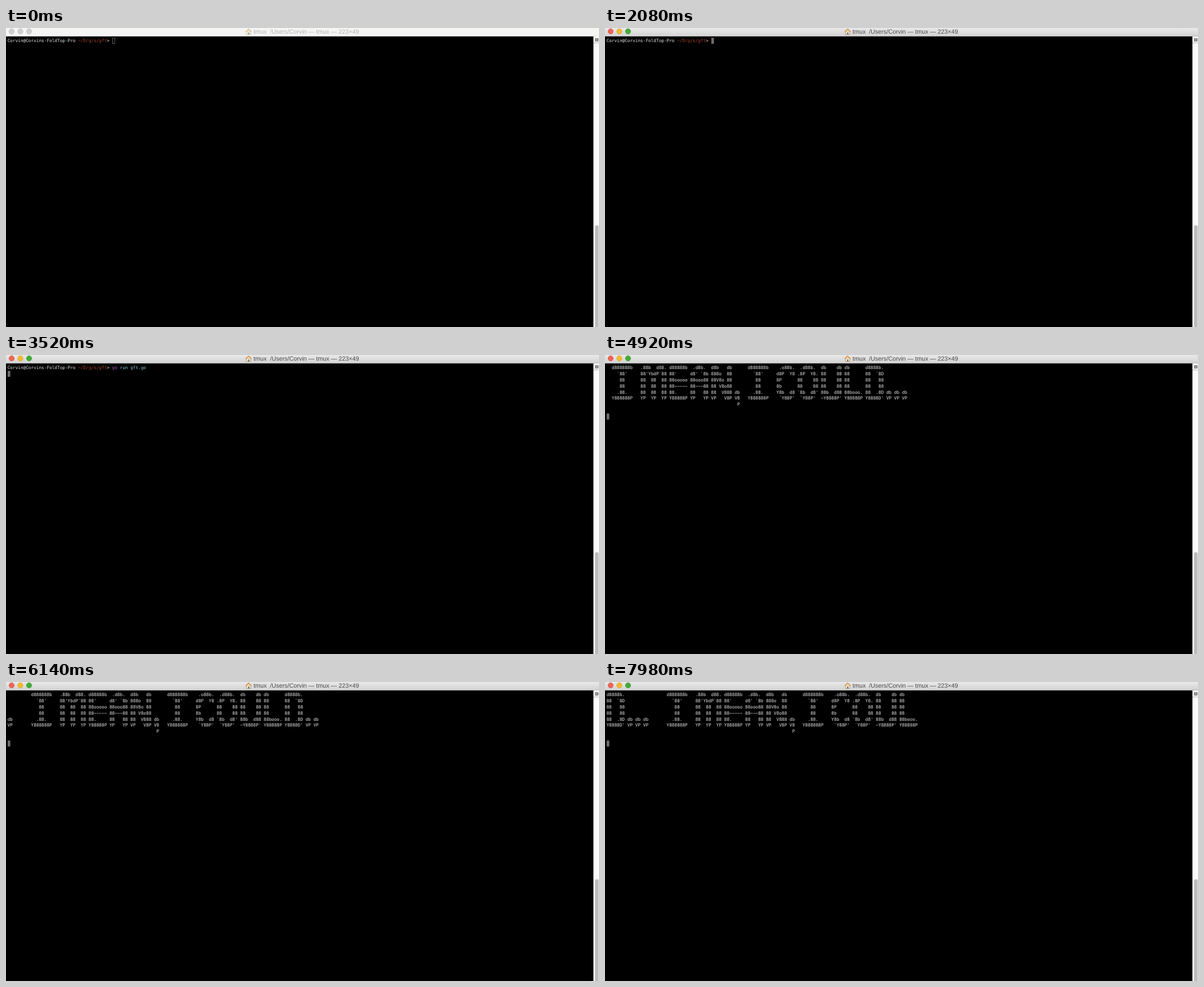
An HTML page that plays this animation: 1054 by 531 pixels, repeating every 8 s.

```html
<!DOCTYPE html>
<html lang="en">
<head>
<meta charset="utf-8">
<title>Terminal banner</title>
<style>
  html, body { margin: 0; width: 100%; height: 100%; overflow: hidden; background: #000; }
  svg { display: block; width: 1054px; height: 531px; }
  text { white-space: pre; text-rendering: geometricPrecision; }
  #title { font: 10.77px "Liberation Sans", Arial, sans-serif; }
  #screen { font: 7.724px "DejaVu Sans Mono", monospace; fill: #e6e6e6; }
</style>
</head>
<body>
<svg viewBox="0 0 1054 531" xmlns="http://www.w3.org/2000/svg">
  <defs>
    <linearGradient id="active" x2="0" y2="1">
      <stop offset="0" stop-color="#e9e9e9"/>
      <stop offset="1" stop-color="#d1d1d1"/>
    </linearGradient>
  </defs>
  <rect width="1054" height="531"/>

  <rect id="bar" width="1054" height="15"/>
  <rect id="edge" y="14" width="1054" height="1"/>
  <g id="lights" stroke-width=".8">
    <circle cx="10" cy="6" r="4.6"/>
    <circle cx="25.5" cy="6" r="4.6"/>
    <circle cx="41" cy="6" r="4.6"/>
  </g>
  <g id="house">
    <path d="M427.5 6.5h7.5v5h-7.5z" fill="#f4efe2" stroke="#8d7a5c" stroke-width=".7"/>
    <path d="M430.2 8h2.4v3.5h-2.4z" fill="#8a6a3c"/>
    <path d="M426 6.8l5.2-5 5.2 5" fill="#f0d9a8" stroke="#c9803a" stroke-width="1.3"/>
  </g>
  <text id="title" x="440" y="10">tmux  /Users/Corvin — tmux — 223×49</text>

  <rect x="1044" y="15" width="10" height="516" fill="#fafafa"/>
  <rect x="1044" y="15" width="1" height="516" fill="#e4e4e4"/>
  <rect x="1044" y="26" width="10" height="1" fill="#b8b8c0"/>
  <path d="M1047.5 18.5h5v5h-5zM1047.5 20.2h5M1047.5 21.8h5" fill="#d8d8d8" stroke="#555" stroke-width=".8"/>
  <path d="M1047 531V353.5a3.2 3.2 0 0 1 6.4 0V531z" fill="#bcbcbc"/>

  <rect id="cursor"/>
  <g id="screen"></g>
</svg>
<script>
const LOOP = 8000, FOCUS = 1120, TYPE = 2180, ENTER = 3100, BANNER = 4600;
const LEFT = 2.7, CELL = 4.65, LINE = 10.83, COLS = 120;
const COMMAND = "go run gft.go", PROMPT_COLS = 40;

const glyphs = {
  " ": " ",
  I: "d888888b|  `88'|   88|   88|  .88.|Y888888P",
  M: ".88b  d88.|88'YbdP`88|88  88  88|88  88  88|88  88  88|YP  YP  YP",
  E: "d88888b|88'|88ooooo|88~~~~~|88.|Y88888P",
  A: " .d8b.|d8' `8b|88ooo88|88~~~88|88   88|YP   YP",
  N: "d8b   db|888o  88|88V8o 88|88 V8o88|88  V888|VP   V8P",
  ",": "||||db|V8| P",
  C: " .o88b.|d8P  Y8|8P|8b|Y8b  d8| `Y88P'",
  O: " .d88b.|.8P  Y8.|88    88|88    88|`8b  d8'| `Y88P'",
  U: "db    db|88    88|88    88|88    88|88b  d88|~Y8888P'",
  L: "db|88|88|88|88booo.|Y88888P",
  D: "d8888b.|88  `8D|88   88|88   88|88  .8D|Y8888D'",
  ".": "||||db|VP"
};

function bannerRows(words) {
  const rows = Array(7).fill("");
  for (const ch of words) {
    const parts = glyphs[ch].split("|");
    const width = Math.max(...parts.map(p => p.length)) + 1;
    rows.forEach((row, i) => rows[i] = row + (parts[i] || "").padEnd(width));
  }
  return rows.map(row => row.padEnd(COLS));
}

const $ = id => document.getElementById(id);
const set = (el, attrs) => { for (const k in attrs) el.setAttribute(k, attrs[k]); };
const svgEl = (tag, parent) =>
  parent.appendChild(document.createElementNS("http://www.w3.org/2000/svg", tag));

const banner = bannerRows("I MEAN, I COULD...");
const lines = banner.map((_, i) => {
  const el = svgEl("text", $("screen"));
  set(el, { x: LEFT, y: 25.3 + i * LINE });
  return el;
});

function span(text, color) {
  const el = svgEl("tspan", lines[0]);
  el.textContent = text;
  if (color) set(el, { fill: color });
}

// Screen updates come in groups of three: after 0, 20 and 40 ms of every 140 ms.
function tick(t) {
  const u = t - 120 + 140, group = Math.floor(u / 140), rest = u - group * 140;
  return (group - 1) * 3 + Math.min(2, Math.floor(rest / 20));
}

function drawWindow(focused) {
  set($("bar"), { fill: focused ? "url(#active)" : "#f5f5f3" });
  set($("edge"), { fill: focused ? "#b9b9b9" : "#dcdcdc" });
  set($("title"), { fill: focused ? "#494949" : "#b2b2b2" });
  set($("house"), { opacity: focused ? 1 : .55 });
  const colors = focused ? ["#ee6558", "#f5b92f", "#42ad36"] : Array(3).fill("#cfcfcf");
  const rims = focused ? ["#d5544a", "#d9a028", "#33942b"] : Array(3).fill("#bdbdbd");
  [...$("lights").children].forEach((c, i) => set(c, { fill: colors[i], stroke: rims[i] }));
}

function drawCursor(col, row, focused) {
  const inset = focused ? 0 : .4;
  set($("cursor"), {
    x: LEFT + col * CELL + .3 + inset, y: 17.3 + row * LINE + inset,
    width: CELL - 2 * inset, height: LINE - .2 - 2 * inset,
    fill: focused ? "#6c6c70" : "none",
    stroke: focused ? "none" : "#77777c", "stroke-width": .8
  });
}

function drawPrompt(typed) {
  span("Corvin@Corvins-FoldTop-Pro ");
  span("~/D/g/s/gft", "#a9432f");
  span("> ");
  span(typed.slice(0, 2), "#b04cc0");
  span(typed.slice(2), "#8ccbd8");
}

let last = "";

function draw(t) {
  const focused = t >= FOCUS, running = t >= BANNER, entered = t >= ENTER;
  const count = Math.max(0, Math.min(COMMAND.length, Math.floor((t - TYPE) / 55)));
  const shift = 2 + Math.max(0, Math.floor((tick(t) - 109) * .355));
  const state = [focused, running, entered, count, shift].join();
  if (state === last) return;
  last = state;

  drawWindow(focused);
  lines.forEach(line => line.textContent = "");
  if (running) {
    lines.forEach((line, i) =>
      line.textContent = banner[i].slice(COLS - shift) + banner[i].slice(0, COLS - shift));
    drawCursor(0, 8, true);
  } else {
    drawPrompt(COMMAND.slice(0, count));
    if (entered) drawCursor(0, 1, true);
    else drawCursor(PROMPT_COLS + count, 0, focused);
  }
}

function frame() {
  draw(performance.now() % LOOP);
  requestAnimationFrame(frame);
}
frame();
</script>
</body>
</html>
```
